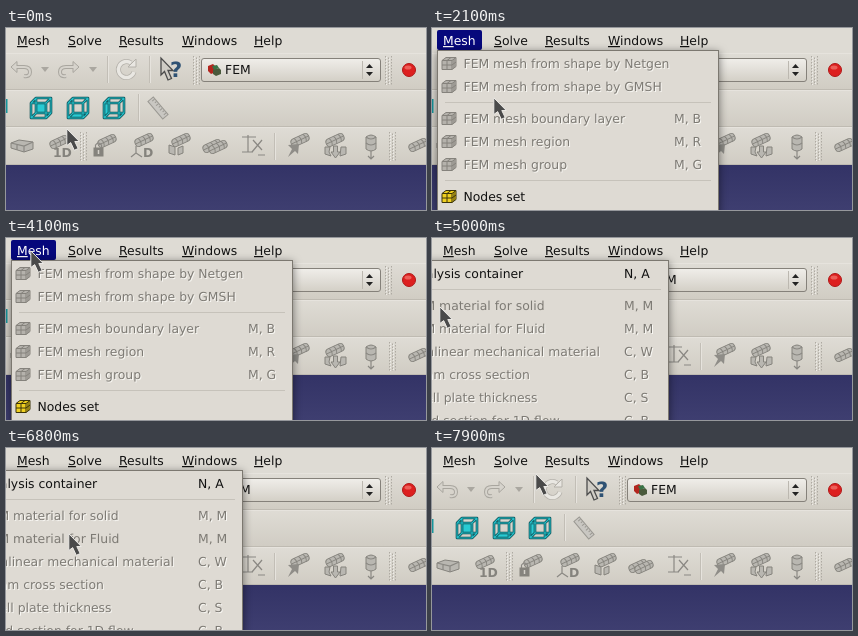
An HTML page for the animation above (8 s loop, 420x182 px).

```html
<!DOCTYPE html>
<html lang="en">
<head>
<meta charset="utf-8">
<title>FEM menus</title>
<style>
  html, body { margin: 0; width: 100%; height: 100%; overflow: hidden; background: #dedbd4; }
  svg { display: block; }
  text { font: 12.4px "DejaVu Sans", sans-serif; fill: #111; text-rendering: geometricPrecision; white-space: pre; }
  .key { text-decoration: underline; }
  .item rect, .menu, .row .bar { visibility: hidden; }
  .item.open rect, .menu.open, .row.on .bar { visibility: visible; }
  .item.open text, .row.on .live { fill: #fff; }
  .menu { filter: drop-shadow(0 2px 4px rgba(0, 0, 0, .5)); }
  .menu:not(.open) .row * { visibility: hidden; }
  .bar { fill: #06087c; }
  .dim { fill: #7d7a74; }
  .etch { fill: #f8f7f3; }
  .row.on .etch { visibility: hidden; }
  .ink { fill: none; stroke: #8a8883; stroke-width: 1.2; }
  .body { fill: #b9b7b1; stroke: #85837d; }
  .letter { fill: #85837d; font-weight: bold; }
</style>
</head>
<body>
<svg id="stage" width="420" height="182" viewBox="0 0 420 182">
  <defs>
    <linearGradient id="sky" x1="0" y1="0" x2="0" y2="1">
      <stop offset="0" stop-color="#333366"/><stop offset="1" stop-color="#3e3e70"/>
    </linearGradient>
    <linearGradient id="panel" x1="0" y1="0" x2="0" y2="1">
      <stop offset="0" stop-color="#dfdcd5"/><stop offset="1" stop-color="#d0ccc3"/>
    </linearGradient>
    <linearGradient id="box" x1="0" y1="0" x2="0" y2="1">
      <stop offset="0" stop-color="#f0eeea"/><stop offset="1" stop-color="#d3cfc6"/>
    </linearGradient>
    <g id="grip" fill="none" stroke-dasharray="1.5 1.5">
      <path d="M.5 0V29M3.5 1.5V29M6.5 0V29" stroke="#aeaaa2"/>
      <path d="M1.5 1V29M4.5 2.5V29" stroke="#eeece8"/>
    </g>
    <g id="split"><path d="M.5 0V27" stroke="#c2beb6"/><path d="M1.5 0V27" stroke="#e6e3dd"/></g>
    <g id="beam" class="body" stroke-width=".9" transform="rotate(-25)">
      <rect x="-9.500" y="-4" width="19" height="8" rx="3.500"/>
      <path d="M-5 -4Q-2.500 0 -5 4M0 -4Q2.500 0 0 4M5 -4Q7.500 0 5 4M-9 0H9" fill="none"/>
    </g>
    <path id="wire" fill="none" stroke-linejoin="round"
      d="M-10 -5H5V10H-10ZM-5 -10H10V5H-5ZM-10 -5L-5 -10M5 -5L10 -10M5 10L10 5M-10 10L-5 5"/>
    <g id="arc" fill="none">
      <path d="M-5 -2H3Q9 -2 9 3T3 7" stroke="#a9a69f" stroke-width="4"/>
      <path d="M-10 -2L-4 -7.500V3.500Z" fill="#d6d3cc" stroke="#a9a69f"/>
      <path d="M-6 -2H3Q9 -2 9 3T3 7" stroke="#d6d3cc" stroke-width="2"/>
    </g>
    <path id="drop" d="M-4 -2H4L0 3Z" fill="#aaa7a0"/>
    <g id="mesh">
      <path d="M-7 -3L-3 -6H7V3L3 6H-7Z"/>
      <path d="M-7 -3H3L7 -6M3 -3V6M-7 1.5H3L7 -1.5M-2 -3V6M-2 -3L2 -6M5 -4.5V4.5" fill="none"/>
    </g>
  </defs>

  <rect width="420" height="25" fill="#dedbd4"/>
  <g fill="url(#panel)">
    <rect y="25" width="420" height="37"/><rect y="62" width="420" height="37"/><rect y="99" width="420" height="38"/>
  </g>
  <rect y="137" width="420" height="45" fill="url(#sky)"/>
  <path d="M0 61.5H420M0 98.5H420M0 136.5H420" stroke="#bfbbb2"/>
  <path d="M0 25.5H420M0 62.5H420M0 99.5H420" stroke="#e6e3dd"/>

  <use href="#arc" x="15" y="41"/>
  <use href="#drop" x="39" y="41"/>
  <use href="#arc" transform="translate(63 41) scale(-1 1)"/>
  <use href="#drop" x="87" y="41"/>
  <use href="#split" x="101" y="28"/>
  <g fill="none">
    <path d="M128 44A8 8 0 1 1 125 35" stroke="#b4b1aa" stroke-width="5"/>
    <path d="M128 44A8 8 0 1 1 125 35" stroke="#e9e7e2" stroke-width="3.400"/>
    <path d="M122 39H130V31Z" fill="#e9e7e2" stroke="#b4b1aa"/>
  </g>
  <use href="#split" x="143" y="28"/>
  <path d="M155 30V47L158.500 43.500L162 52L165.500 50.500L162 42.500H167Z" fill="#cfccc5" stroke="#4c4c4c" stroke-width="1.300"/>
  <text x="164" y="49" style="font-size:21px;font-weight:bold;fill:#2f5274">?</text>
  <use href="#grip" x="187" y="28"/>
  <rect x="195.500" y="30.500" width="179" height="23" rx="2.500" fill="url(#box)" stroke="#85817a"/>
  <path d="M356.500 33V51" stroke="#bcb8b0"/>
  <path d="M202 38L207 36L210 39V44L205 46L202 43Z" fill="#b3261e"/>
  <path d="M207 42L213 40L215 42V46L210 48L207 46Z" fill="#4a5a3c"/>
  <path d="M206 38L211 37L213 40L208 42Z" fill="#397346"/>
  <text x="219" y="46">FEM</text>
  <path d="M360 40H367L363.500 36ZM360 44H367L363.500 48Z" fill="#222"/>
  <use href="#grip" x="379" y="28"/>
  <circle cx="403" cy="42" r="6.500" fill="#dd2020" stroke="#b01818"/>
  <ellipse cx="402" cy="39.500" rx="3.500" ry="2" fill="#ec5f59"/>

  <rect y="71" width="1.500" height="14" fill="#16959c"/>
  <g id="cubes"></g>
  <use href="#split" x="132" y="66"/>
  <g transform="translate(152 80) rotate(50)" fill="#c9c7c2" stroke="#9b9993">
    <rect x="-11.500" y="-3.500" width="23" height="7"/>
    <path d="M-9 -3V0M-6 -3V-1M-3 -3V0M0 -3V-1M3 -3V0M6 -3V-1M9 -3V0"/>
  </g>

  <g id="tools">
    <path class="body" d="M5 115L13 112L27 114V121L18 124L5 120Z"/>
    <path class="ink" d="M5 115L18 118L27 114M18 118V124M11 117V122"/>
    <use href="#beam" x="53" y="114"/>
    <text class="letter" x="47" y="129" style="font-weight:bold;fill:#85837d">1D</text>
    <use href="#grip" x="74" y="104"/>
    <use href="#beam" x="101" y="113"/>
    <path d="M89.500 120V117Q92.500 113 95.500 117V120" class="ink"/>
    <rect x="87.500" y="119.500" width="10" height="9" fill="#85837d"/>
    <path d="M92.500 122V126" stroke="#d4d1ca" stroke-width="1.500"/>
    <use href="#beam" x="138" y="112"/>
    <path class="ink" d="M130 118V125L125 129M130 125L136 129"/>
    <text x="137" y="129" style="font-weight:bold;fill:#85837d">D</text>
    <use href="#beam" x="175" y="112"/>
    <path class="body" d="M163 117L169 119V127L163 125ZM172 120L177 118V125L172 127Z"/>
    <use href="#beam" x="206" y="118"/><use href="#beam" x="212" y="119"/>
    <path class="ink" d="M236 109H250M242 107V124M236 124H247M247 112L256 122M256 112L246 124M252 127H259"/>
    <use href="#split" x="268" y="105"/>
    <use href="#beam" x="294" y="112"/>
    <path d="M282 129L286 121L282 117L293 116L292 126L289 123Z" fill="#8f8d88"/>
    <use href="#beam" x="329" y="112"/>
    <path class="body" d="M319 119L324 119L323 124L325 128L319 126ZM327.500 118H331.500V124H334L329.500 130L325 124H327.500ZM335 119H340L340 126L334 128Z"/>
    <path class="body" d="M360 109Q365 105 370 109V121Q365 125 360 121Z"/>
    <path class="ink" d="M360 109Q365 113 370 109M360 115Q365 119 370 115M365 123V131M362 128L365 131L368 128"/>
    <use href="#grip" x="383" y="104"/>
    <use href="#beam" x="412" y="117"/>
  </g>
  <g id="menubar"></g>
  <g id="menus"></g>
  <path id="cursor" d="M.8 .8V17.500L4.700 14.600L8.300 22.300L12.200 20.500L8.800 13.500H13.300Z" fill="#4a4a4a" stroke="#eceae6"/>
</svg>
<script>
const LOOP = 8000, STEP = 100, TOP = 24, ROW = 23, GAP = 9;
const $ = id => document.getElementById(id);

function add(parent, tag, attrs, text) {
  const node = document.createElementNS('http://www.w3.org/2000/svg', tag);
  for (const name in attrs) node.setAttribute(name, attrs[name]);
  if (text) node.textContent = text;
  return parent.appendChild(node);
}

// Cyan view cubes, each with a different face filled
[[35, 'M-5 -5H5V5H-5Z'], [72, 'M-10 10L-5 5H10L5 10Z'], [108, 'M-10 -5L-5 -10V5L-10 10Z']].forEach(([x, face]) => {
  const g = add($('cubes'), 'g', { transform: `translate(${x} 80)` });
  add(g, 'path', { d: face, fill: '#29cbd3' });
  add(g, 'use', { href: '#wire', stroke: '#0d4c52', 'stroke-width': 2.6 });
  add(g, 'use', { href: '#wire', stroke: '#25bfc8', 'stroke-width': 1.1 });
});

// Bar entries: label, text x, highlight width
const items = {};
[['Mesh', 11, 45], ['Solve', 62, 45], ['Results', 113, 57], ['Windows', 176, 66], ['Help', 248, 40]].forEach(([label, x, w]) => {
  const g = items[label] = add($('menubar'), 'g', { class: 'item' });
  add(g, 'rect', { x: x - 6, y: 2, width: w, height: 20, rx: 2, class: 'bar' });
  const text = add(g, 'text', { x, y: 17 });
  add(text, 'tspan', { class: 'key' }, label[0]);
  add(text, 'tspan', {}, label.slice(1));
});

// Rows: "label|shortcut", a leading * marks an enabled row, - a separator
const specs = {
  Model: [-49, 237, ['*Analysis container|N, A', '-', 'FEM material for solid|M, M', 'FEM material for Fluid|M, M',
    'Nonlinear mechanical material|C, W', 'Beam cross section|C, B', 'Shell plate thickness|C, S', 'Fluid section for 1D flow|C, B']],
  Mesh: [5, 287, ['FEM mesh from shape by Netgen|', 'FEM mesh from shape by GMSH|', '-', 'FEM mesh boundary layer|M, B',
    'FEM mesh region|M, R', 'FEM mesh group|M, G', '-', '*Nodes set|', '-']],
  Solve: [56, 289, ['Solver CalculiX|S, X', 'Solver Elmer|S, E', '-', 'Solver job control|S, C', 'Run solver calculation|S, R']],
  Results: [107, 283, ['Purge results|R, P', 'Show result|R, S']]
};

function buildMenu(left, right, lines) {
  const g = add($('menus'), 'g', { class: 'menu' });
  const frame = add(g, 'rect', { x: left + .5, y: 22.5, width: right - left - 1, fill: '#dedad3', stroke: '#7c7870' });
  const rows = [];
  let y = TOP;
  for (const line of lines) {
    if (line === '-') {
      add(g, 'path', { d: `M${left + 8} ${y + 4.5}H${right - 8}`, stroke: '#c6c2ba' });
      y += GAP;
      continue;
    }
    const live = line[0] === '*';
    const [label, keys] = line.replace('*', '').split('|');
    const row = add(g, 'g', { class: 'row' });
    if (live) add(row, 'rect', { x: left + 3, y, width: right - left - 6, height: ROW, rx: 2, class: 'bar' });
    add(row, 'use', { href: '#mesh', x: left + 12, y: y + 11.5,
      fill: live ? '#f0d020' : '#b5b2ac', stroke: live ? '#3c340a' : '#85827c' });
    const write = (cls, d) => [[label, left + 26.5], [keys, right - 45]].forEach(([s, x]) =>
      s && add(row, 'text', { x: x + d, y: y + 16 + d, class: cls }, s));
    if (live) write('live', 0);
    else { write('etch', 1); write('dim', 0); }
    rows.push({ row, y });
    y += ROW;
  }
  frame.setAttribute('height', y - 19);
  return { g, rows, left, right };
}
const menus = {};
for (const name in specs) menus[name] = buildMenu(...specs[name]);

const opened = [[0, ''], [700, 'Mesh'], [3500, 'Solve'], [4000, 'Mesh'], [4300, 'Model'], [7200, 'Results'], [7600, '']];
// Pointer moves: first step, last step, x, y
const moves = [
  [0, 0, 60, 100], [100, 300, 17, 14], [1300, 1700, 60, 87], [1900, 2300, 62, 57], [2600, 3000, 62, 113],
  [3200, 3400, 66, 16], [3500, 3500, 74, 8], [4000, 4100, 24, 12], [4200, 4400, -16, 12], [4900, 4900, -16, 63],
  [5000, 5400, 98, 89], [5600, 5800, 106, 85], [5900, 6400, 77, 85], [6500, 6600, 15, 85], [6800, 6800, 62, 85],
  [6900, 7100, 112, 15], [7200, 7300, 114, 0], [7900, 7900, 103, 25]
];

function pointer(t) {
  let x = 0, y = 0;
  for (const [from, to, tx, ty] of moves) {
    if (t < from) break;
    const p = Math.min(1, (t - from + STEP) / (to - from + STEP));
    x += (tx - x) * p;
    y += (ty - y) * p;
  }
  return [Math.round(x), Math.round(y)];
}

function draw(now) {
  const t = Math.floor(now % LOOP / STEP) * STEP;
  const [x, y] = pointer(t);
  const name = opened.filter(([at]) => at <= t).pop()[1];
  $('cursor').setAttribute('transform', `translate(${x} ${y})`);
  for (const key in items) items[key].classList.toggle('open', key === name);
  for (const key in menus) {
    const { g, rows, left, right } = menus[key];
    g.classList.toggle('open', key === name);
    for (const r of rows) {
      const over = x + 1 >= left && x < right && y + 1 >= r.y && y + 1 < r.y + ROW;
      r.row.classList.toggle('on', key === name && over);
    }
  }
}

const start = performance.now();
function tick() {
  draw(performance.now() - start);
  requestAnimationFrame(tick);
}
tick();
</script>
</body>
</html>
```
